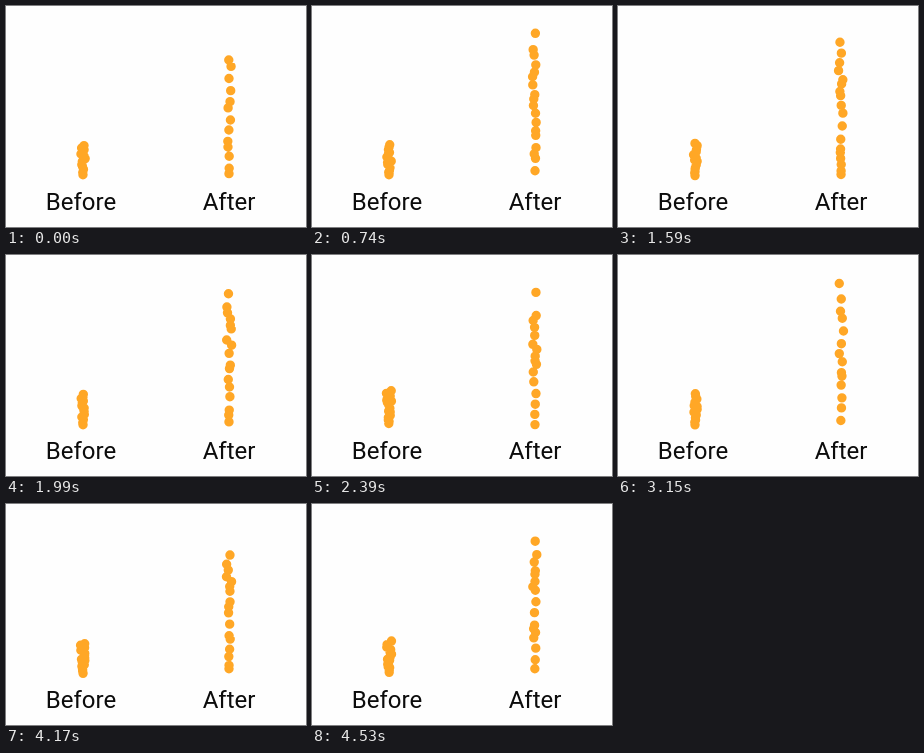
Recreate the animation shown at these times as an HTML page. Size 300x221 px, loop 4630 ms.

```html
<!DOCTYPE html>
<html lang="en">
<head>
<meta charset="utf-8">
<title>Before and after</title>
<style>
  html, body { margin: 0; width: 100%; height: 100%; overflow: hidden; background: #fefefe; }
  svg { display: block; width: 100vw; height: 100vh; }
  text { font: 24px Roboto, sans-serif; text-anchor: middle; fill: #0c0c0c; }
  path { fill: none; stroke: #ffa726; stroke-width: 9.4; stroke-linecap: round; }
</style>
</head>
<body>
<svg viewBox="0 0 300 221">
  <path id="dots"/>
  <text x="75" y="204">Before</text>
  <text x="223" y="204">After</text>
</svg>
<script>
// Times in ms, speeds in px per ms.
const LOOP = 4630, LAST = 4530, TICK = LAST / 92;
const FLOOR = 170, MIN_LIFE = 490, MAX_LIFE = 615;

let seed = 7;
const random = () => (seed = seed * 16807 % 2147483647) / 2147483647;
const between = (low, high) => low + (high - low) * random();

// One dot about every 35 ms, each with its own lifetime and sideways drift.
function makeStream(x, speed) {
  const dots = [];
  for (let born = -MAX_LIFE; born < LAST; born += between(14, 56))
    dots.push({ born, life: between(MIN_LIFE, MAX_LIFE), drift: between(-2.7, 2.7) });
  return { x, speed, dots };
}
const streams = [makeStream(77, 0.06), makeStream(223, 0.24)];

const path = document.getElementById("dots");
function draw(time) {
  const t = Math.min(LAST, Math.floor(time / TICK) * TICK);
  let d = "";
  for (const { x, speed, dots } of streams)
    for (const { born, life, drift } of dots) {
      const age = t - born;
      if (age < 0 || age > life) continue;
      const spread = Math.min(1, age / 300);
      d += `M${(x + drift * spread).toFixed(2)} ${(FLOOR - age * speed).toFixed(2)}h0`;
    }
  path.setAttribute("d", d);
}

const start = performance.now();
function frame() {
  draw((performance.now() - start) % LOOP);
  requestAnimationFrame(frame);
}
frame();
</script>
</body>
</html>
```
